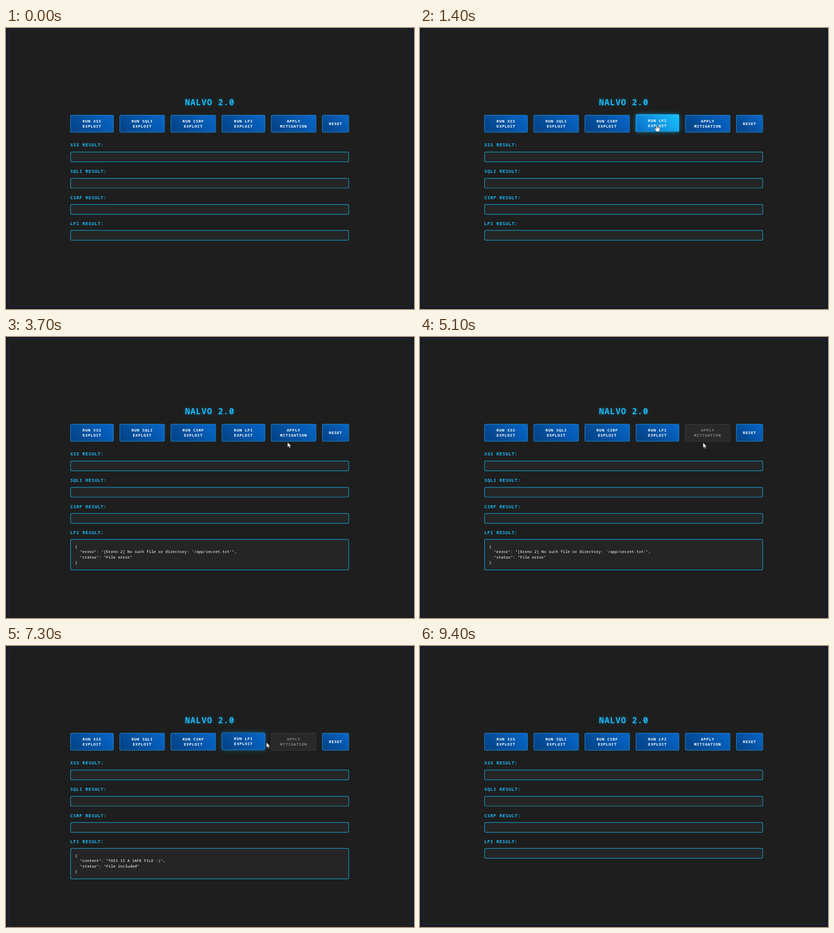
Recreate the animation shown at these times as an HTML page. Size 800 by 553 pixels, loop 9.9 s.

```html
<!DOCTYPE html>
<html lang="en">
<head>
<meta charset="utf-8">
<title>Exploit console</title>
<style>
  html, body { margin: 0; width: 100%; height: 100%; overflow: hidden; background: #181a24; }
  body { position: relative; }
  body * { position: absolute; box-sizing: border-box; }
  /* The page is laid out at full size and shown at 60 % */
  #page {
    left: 0; top: 0; width: 1333px; height: 922px; transform: scale(.6); transform-origin: 0 0;
    font: 500 12.95px/17.25px "Noto Sans Mono", "DejaVu Sans Mono", monospace;
  }
  #panel { left: 8px; top: 4px; width: 1316px; border: 2px solid #20273a; border-radius: 8px; background: #1e1e1e; }
  h1, h2 { margin: 0; color: #1cb9f6; font-weight: 800; white-space: nowrap; }
  h1 { left: 0; top: 224px; width: 1332px; font-size: 26.67px; line-height: 40px; letter-spacing: 2px; text-align: center; text-shadow: 0 0 10px #00bfff66; }
  h2 { left: 210px; font-size: 14.9px; line-height: 20px; letter-spacing: 1px; }
  .button {
    top: 285px; height: 58px; display: grid; place-content: center;
    border: 2px solid #1583d0; border-radius: 5px; color: #fff;
    background: linear-gradient(45deg, #044080, #0667cb) border-box;
    font-size: 13px; font-weight: 600; letter-spacing: 1px; text-align: center; white-space: pre;
  }
  .button.hover { background: linear-gradient(45deg, #0a6acb, #18c4fb) border-box; border-color: #1cb9f6; }
  .button.disabled { background: #292929; border-color: #363636; color: #858585; }
  .result { left: 210px; width: 911px; padding: 13px 14px; border: 2px solid #1795c0; border-radius: 5px; background: #252525; color: #fff; white-space: pre; }
  svg { left: 0; top: 0; overflow: visible; }
</style>
</head>
<body>
<div id="page">
  <div id="panel"></div>
  <h1>NALVO 2.0</h1>
</div>
<svg id="cursor" width="1" height="1" fill="#fff" stroke="#222" stroke-width=".7" stroke-linejoin="round">
  <path id="arrow" d="M0 0V10.3L2.4 8.1L4 11.8L5.8 11L4.2 7.4H7.4Z"/>
  <path id="hand" d="M-1 .8Q0-.7 1 .8V5Q2 4 3 5Q4 4.3 5 5.4Q6.7 4.8 6.8 6.7V10Q6.8 11.5 5.6 12.5V14H-.5V12.7L-3.8 8.3Q-4.2 6.8-2.7 6.9L-1 8.4ZM1 5V7.5M3 5V7.7M5 5.4V7.8"/>
</svg>
<script>
const LOOP = 9900, STEP = 100, SCALE = 0.6;
const page = document.getElementById("page");
const panel = document.getElementById("panel");
const cursor = document.getElementById("cursor");
const arrow = document.getElementById("arrow");
const hand = document.getElementById("hand");

function add(className, tag, styles, text = "") {
  const el = document.createElement(tag);
  el.className = className;
  el.textContent = text;
  Object.assign(el.style, styles);
  return page.appendChild(el);
}

const buttons = [
  ["RUN XSS\nEXPLOIT", 210, 142],
  ["RUN SQLI\nEXPLOIT", 371, 148],
  ["RUN CSRF\nEXPLOIT", 538, 148],
  ["RUN LFI\nEXPLOIT", 705, 142],
  ["APPLY\nMITIGATION", 866, 148],
  ["RESET", 1033, 88],
].map(([label, x, w]) => ({ x, w, el: add("button", "div", { left: x + "px", width: w + "px" }, label) }));
const apply = buttons[4];

const results = ["XSS", "SQLI", "CSRF", "LFI"].map((name, i) => {
  const y = 406 + Math.round(85.8 * i);
  add("", "h2", { top: y - 33 + "px" }, name + " RESULT:");
  return add("result", "div", { top: y + "px", height: "34px" });
});
const lfiResult = results[3];

const errorText = `{
  "error": "[Errno 2] No such file or directory: '/app/secret.txt'",
  "status": "File error"
}`;
const safeText = `{
  "content": "THIS IS A SAFE FILE :)",
  "status": "File included"
}`;

// Cursor waypoints: time, x, y
const path = [
  [100, 500, 14], [1400, 463.5, 190], [1800, 463.5, 190],
  [2400, 488, 228], [2800, 488, 228], [3700, 552, 207], [4500, 560, 191], [4600, 560, 191],
  [5100, 555, 208], [6300, 466.5, 190], [6900, 466.5, 190],
  [8100, 636.5, 189], [8400, 640, 189], [8800, 640, 189], [9400, 648, -20],
];

function cursorAt(t) {
  const next = path.findIndex(point => point[0] >= t);
  if (t < path[0][0] || next < 0) return [0, -50];
  if (next === 0) return path[0].slice(1);
  const [t0, x0, y0] = path[next - 1], [t1, x1, y1] = path[next];
  const u = (t - t0) / (t1 - t0), ease = u * u * (3 - 2 * u);
  return [x0 + (x1 - x0) * ease, y0 + (y1 - y0) * ease];
}

const isDisabled = (button, t) => button === apply && t >= 4700 && t < 8900;

function isOver(button, t) {
  const [x, y] = cursorAt(t).map(v => v / SCALE);
  return !isDisabled(button, t) && x > button.x && x < button.x + button.w && y > 285 && y < 343;
}

function render(now) {
  const t = Math.floor(now % LOOP / STEP) * STEP;
  const text = t < 1800 || t >= 8900 ? "" : t < 6800 ? errorText : safeText;
  lfiResult.textContent = text;
  lfiResult.style.height = text ? "102px" : "34px";
  panel.style.height = text ? "980px" : "910px";

  let pointing = false;
  for (const button of buttons) {
    const over = isOver(button, t);
    // Averaging recent samples gives the 300 ms hover transition
    const glow = [0, 1, 2].reduce((sum, k) => sum + isOver(button, t - k * STEP), 0) / 3;
    pointing ||= over;
    button.el.classList.toggle("hover", over);
    button.el.classList.toggle("disabled", isDisabled(button, t));
    button.el.style.transform = `translateY(${-2 * glow}px)`;
    button.el.style.boxShadow = `0 0 15px rgba(0, 191, 255, ${0.55 * glow})`;
  }

  const [x, y] = cursorAt(t);
  cursor.style.transform = `translate(${x}px, ${y}px)`;
  hand.style.display = pointing ? "" : "none";
  arrow.style.display = pointing ? "none" : "";
}

function tick() {
  render(performance.now());
  requestAnimationFrame(tick);
}
tick();
</script>
</body>
</html>
```
